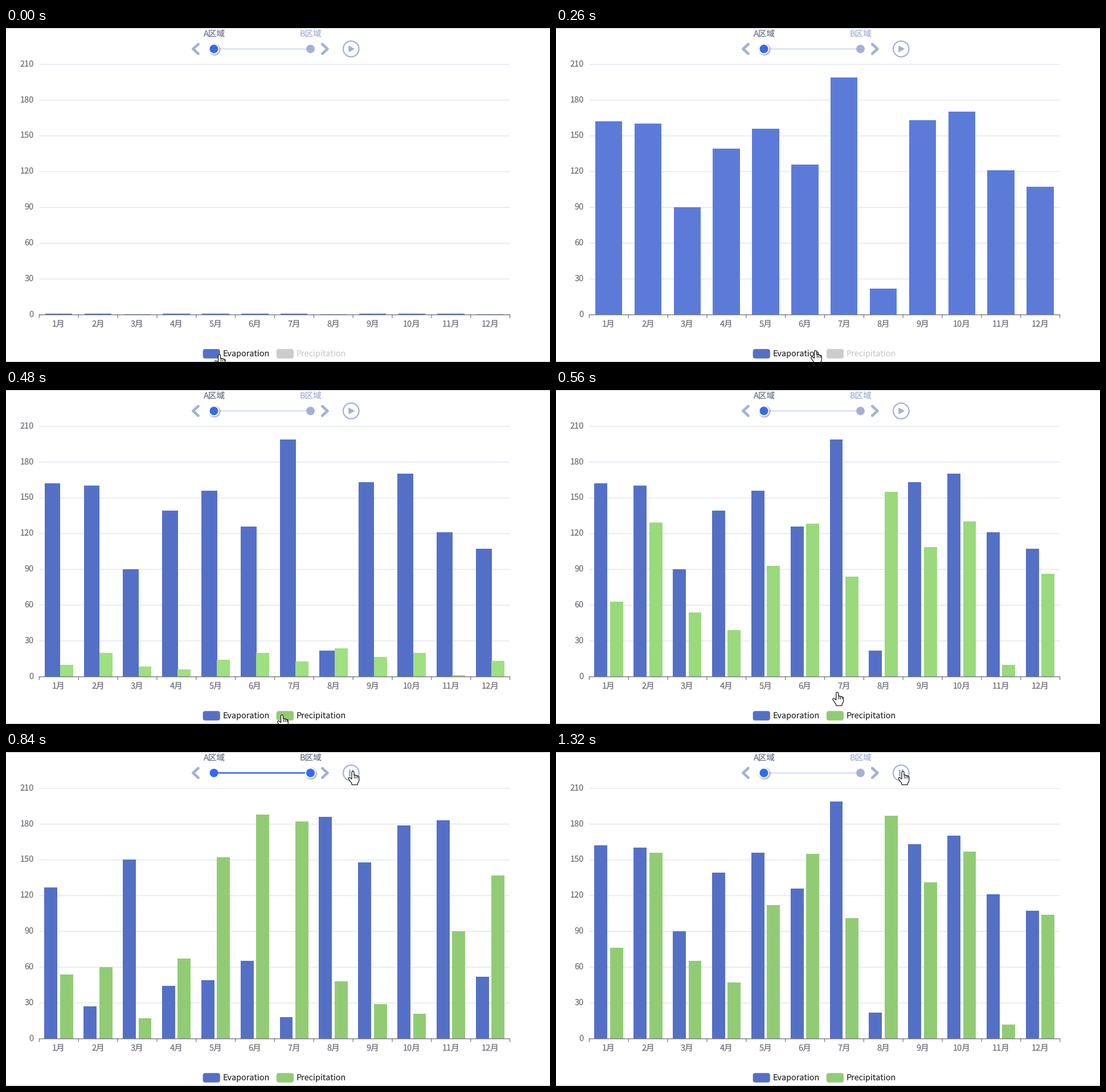
Animation, 955 px wide and 587 px high, one loop 1540 ms. Source, as a matplotlib script:

```python
import matplotlib.pyplot as plt
import numpy as np
from matplotlib.animation import FuncAnimation
from matplotlib.colors import to_rgb
from matplotlib.patches import Circle, FancyBboxPatch, PathPatch, Polygon, Rectangle
from matplotlib.path import Path

W, H, DPI = 955, 587, 100
STEP, LOOP = 20, 1540
PT = 72 / DPI

plt.rcParams["font.family"] = ["Noto Sans CJK JP", "DejaVu Sans"]
plt.rcParams["text.hinting"] = "none"

BLUE, BLUE_LIT = "#5470c6", "#5c7bd9"
GREEN, GREEN_LIT = "#91cc75", "#9fe080"
GRID, AXIS = "#e0e6f1", "#6e7079"
MUTED, TRACK, ACTIVE, DONE = "#a4b1d7", "#dae1f5", "#316bf3", "#6f778d"
IDLE_KNOB, OFF, INK = "#3a6ae0", "#cccccc", "#333333"

# Monthly values of both regions
EVAP = (np.array([162, 160, 90, 139, 156, 126, 199, 22, 163, 170, 121, 107]),
        np.array([127, 27, 150, 44, 49, 65, 18, 186, 148, 179, 183, 52]))
RAIN = (np.array([76, 156, 65, 47, 112, 155, 101, 187, 131, 157, 12, 104]),
        np.array([54, 60, 17, 67, 152, 188, 182, 48, 29, 21, 90, 137]))

# Chart geometry in pixels
LEFT, RIGHT, BASE, UNIT = 58.2, 884.4, 503.7, 2.0955
BAND = (RIGHT - LEFT) / 12
MID = LEFT + BAND * (np.arange(12) + 0.5)
WIDE = BAND * 0.69
SLIM = BAND * 0.73 / 2.2
XA, XB, YT = 365, 534.5, 36.8

# Event times in ms
GROW, SHOW_RAIN, PLAY, TO_B, TO_A = -26, 404, 660, 720, 1200
INIT_MS, UPDATE_MS, KNOB_MS, STATE_MS = 240, 120, 72, 72

CURSOR_T = [0, 40, 240, 300, 400, 540, 660]
CURSOR_XY = np.array([(374.5, 574), (374.5, 574), (455, 567), (457, 567),
                      (484.5, 571), (484.5, 571), (609, 34)])


def progress(t, start, span):
    return min(max((t - start) / span, 0), 1)


def in_out(u, power=3):
    if u < 0.5:
        return 2 ** (power - 1) * u ** power
    return 1 - 2 ** (power - 1) * (1 - u) ** power


def out(u):
    return 1 - (1 - u) ** 3


def mix(a, b, k):
    return np.array(a) * (1 - k) + np.array(b) * k


def blend(a, b, k):
    return tuple(mix(to_rgb(a), to_rgb(b), k))


def lit(t, on, off):
    return out(progress(t, on, STATE_MS)) - out(progress(t, off, STATE_MS))


def cursor_at(t):
    if t >= CURSOR_T[-1]:
        return CURSOR_XY[-1]
    i = np.searchsorted(CURSOR_T, t, side="right") - 1
    u = progress(t, CURSOR_T[i], CURSOR_T[i + 1] - CURSOR_T[i])
    return mix(CURSOR_XY[i], CURSOR_XY[i + 1], u * u * (3 - 2 * u))


fig = plt.figure(figsize=(W / DPI, H / DPI), dpi=DPI, facecolor="white")
ax = fig.add_axes([0, 0, 1, 1])
ax.set_xlim(0, W)
ax.set_ylim(H, 0)
ax.axis("off")


def line(xs, ys, color, px, z, cap="butt"):
    return ax.plot(xs, ys, color=color, lw=px * PT, zorder=z, snap=False,
                   solid_capstyle=cap, solid_joinstyle="round")[0]


def text(x, y, s, color, ha="center", px=14.6):
    return ax.text(x, y, s, color=color, ha=ha, va="baseline",
                   fontsize=px * PT, zorder=8)


def shape(patch, z, fill="none", edge="none", px=0):
    patch.set(facecolor=fill, edgecolor=edge, linewidth=px * PT, zorder=z)
    return ax.add_patch(patch)


def dot(x, y, r, color, z):
    return shape(Circle((x, y), r), z, color)


def swatch(x, color):
    box = FancyBboxPatch((x, 564.2), 30.2, 16.6,
                         boxstyle="round,pad=0,rounding_size=4.2")
    return shape(box, 6, color)


# Stage borders, grid and axes
for y in (0.5, H - 0.5):
    line([0, W], [y, y], "#c8c8c8", 1, 9)
for v in range(0, 211, 30):
    y = BASE - v * UNIT
    if v:
        line([LEFT, RIGHT], [y + 0.2, y + 0.2], GRID, 1.4, 1)
    text(49, y + 3.9, str(v), AXIS, "right")
line([LEFT - 0.5, RIGHT + 0.5], [BASE + 0.3, BASE + 0.3], AXIS, 1.3, 5)
for i in range(13):
    x = LEFT + 0.2 + i * BAND
    line([x, x], [BASE, BASE + 6], AXIS, 1.2, 5)
for i, x in enumerate(MID):
    text(x, 524.5, f"{i + 1}月", AXIS)


def bar_row(z):
    return [shape(Rectangle((x, BASE), 0, 0), z) for x in MID]


evap_bars, rain_bars = bar_row(3), bar_row(4)

# Legend
swatch(345.6, BLUE)
text(381, 577, "Evaporation", INK, "left", 14.4)
rain_swatch = swatch(474.8, OFF)
rain_text = text(510, 577, "Precipitation", OFF, "left", 14.4)

# Timeline
line([XA, XB], [YT, YT], TRACK, 2.5, 6)
done_line = line([XA, XA], [YT, YT], ACTIVE, 2.5, 6.1)
dot_a = dot(XA, YT, 7.4, MUTED, 6.2)
dot(XB, YT, 7.4, MUTED, 6.2)
text(XA, 15, "A区域", DONE)
label_b = text(XB + 0.5, 15, "B区域", MUTED)
for tip, back in ((328.4, 337.6), (564.4, 555.2)):
    line([back, tip, back], [28.4, YT, 45.2], MUTED, 4.7, 6, "round")

knob_shadow = [dot(XA + 1.2, YT + 1.2, r, (0, 0, 0, 0.085), 6.5)
               for r in (9.2, 9.8, 10.4, 11)]
knob_ring = dot(XA, YT, 9.4, "white", 6.6)
knob = dot(XA, YT, 7.5, ACTIVE, 6.7)

# Play and pause button
shape(Circle((605.8, YT), 13.8), 6, edge=MUTED, px=2.2)
play_icon = shape(Polygon([(602, 32), (602, 41.6), (610.8, YT)], joinstyle="round"),
                  6, MUTED, MUTED, 1.6)
pause_icon = [shape(Rectangle((x, 31), 2.6, 12), 6, MUTED) for x in (602, 607.4)]

# Hand cursor, drawn from its fingertip
M, L, C = Path.MOVETO, Path.LINETO, Path.CURVE3
hand_steps = [
    (M, -2, 2), (C, -2, 0), (C, 0, 0), (C, 2, 0), (C, 2, 2), (L, 2, 7),
    (C, 3.6, 5.2), (C, 5, 7.6), (C, 6.6, 6), (C, 8, 8.4),
    (C, 10.8, 7.4), (C, 10.8, 10.4), (L, 10.8, 15.5),
    (C, 10.6, 18.5), (C, 8.6, 20.5), (L, 8.2, 23.6), (L, -1.8, 23.6),
    (L, -2.4, 20.6), (C, -5, 17.6), (C, -7.4, 13.6),
    (C, -8.6, 11.2), (C, -6.6, 10.8), (C, -4.6, 10.4), (C, -2, 13.6), (L, -2, 2),
]
HAND = Path([s[1:] for s in hand_steps], [s[0] for s in hand_steps])
KNUCKLES = Path([(2, 7), (2, 11.5), (5, 7.6), (5, 11.8), (8, 8.4), (8, 12)],
                [M, L] * 3)
hand = shape(PathPatch(HAND), 10, "white", "#111111", 1.2)
knuckles = shape(PathPatch(KNUCKLES), 11, edge="#111111", px=1.1)


def set_bars(bars, values, offset, width, color):
    for bar, x, v in zip(bars, MID, values):
        bar.set_bounds(x + offset, BASE - v * UNIT, width, v * UNIT)
        bar.set_facecolor(color)


def update(i):
    t = i * STEP

    # Bars
    region = in_out(progress(t, TO_B, UPDATE_MS)) - in_out(progress(t, TO_A, UPDATE_MS))
    narrow = in_out(progress(t, SHOW_RAIN, UPDATE_MS))
    evap_size = in_out(progress(t, GROW, INIT_MS))
    rain_size = in_out(progress(t, SHOW_RAIN, INIT_MS))
    set_bars(evap_bars, mix(*EVAP, region) * evap_size,
             mix(-WIDE / 2, -1.1 * SLIM, narrow), mix(WIDE, SLIM, narrow),
             blend(BLUE, BLUE_LIT, lit(t, 30, 320)))
    set_bars(rain_bars, mix(*RAIN, region) * rain_size, 0.1 * SLIM, SLIM,
             blend(GREEN, GREEN_LIT, lit(t, SHOW_RAIN - STATE_MS, 550)))

    # Legend
    rain_on = t >= SHOW_RAIN
    rain_swatch.set_facecolor(GREEN if rain_on else OFF)
    rain_text.set_color(INK if rain_on else OFF)

    # Timeline
    at_b = TO_B <= t < TO_A
    slide = (in_out(progress(t, TO_B, KNOB_MS), 5)
             - in_out(progress(t, TO_A, KNOB_MS), 5))
    x = float(mix(XA, XB, slide))
    done_line.set_xdata([XA, x])
    dot_a.set_facecolor(ACTIVE if at_b else MUTED)
    label_b.set_color(DONE if at_b else MUTED)
    for s in knob_shadow:
        s.center = (x + 1.2, YT + 1.2)
    knob_ring.center = knob.center = (x, YT)
    knob.set_facecolor(ACTIVE if t >= TO_B else IDLE_KNOB)

    playing = t >= PLAY
    play_icon.set_visible(not playing)
    for p in pause_icon:
        p.set_visible(playing)

    # Cursor
    pos = cursor_at(t)
    hand.set_path(Path(HAND.vertices + pos, HAND.codes))
    knuckles.set_path(Path(KNUCKLES.vertices + pos, KNUCKLES.codes))
    return []


anim = FuncAnimation(fig, update, frames=LOOP // STEP, interval=STEP,
                     init_func=lambda: update(0), repeat=True, repeat_delay=0)
plt.show()
```
